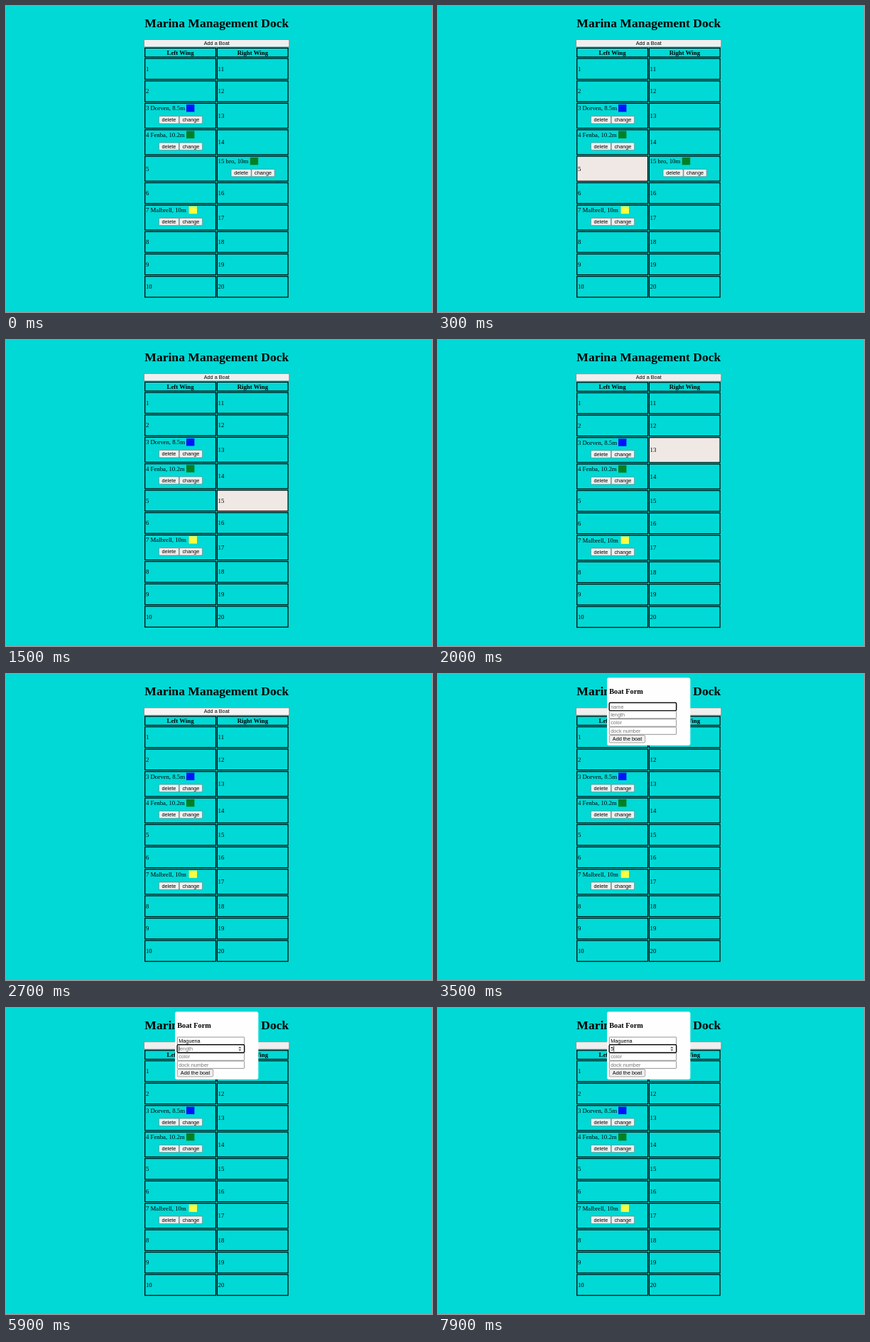
An HTML page for the animation above (8 s loop, 600x432 px).

```html
<!DOCTYPE html>
<html lang="en">
<head>
<meta charset="utf-8">
<title>Marina Management Dock</title>
<style>
html, body { margin: 0; width: 100%; height: 100%; overflow: hidden; background: #00d9d5; }
svg { display: block; }
text { white-space: pre; }
.serif { font: 8.8px "Liberation Serif", "Times New Roman", serif; }
.bold { font-weight: bold; }
.sans { font: 7.3px "Liberation Sans", Arial, sans-serif; }
.menu { font: 500 7.9px "Noto Sans", sans-serif; }
</style>
</head>
<body>
<svg id="stage" width="600" height="432" viewBox="0 0 600 432"></svg>
<script>
const LOOP = 8000;
const LINE = 1.2;
const stage = document.getElementById('stage');
const pen = document.createElement('canvas').getContext('2d');

// each track is a list of [start, value]; the last one reached holds
const at = (track, t) => track.reduce((v, [start, value]) => t >= start ? value : v, track[0][1]);

const hoverCell = [[0, 0], [200, 3], [300, 5], [500, 15], [1900, 14], [2000, 13], [2100, 0]];
const deleteFill = [[0, '#efefef'], [600, '#e5e5e5'], [1000, '#f5f5f5'], [1200, '#e2e5e8']];
const addFill = [[0, '#efefef'], [2300, '#e5e5e5'], [2700, '#f5f5f5'], [3000, '#efefef']];
const nameText = [[0, ''], [4600, 'M'], [4800, 'Ma'], [5000, 'Mag'], [5300, 'Magu'],
  [5500, 'Mague'], [5600, 'Maguen'], [5700, 'Maguena']];
const menuRows = [[0, 0], [4700, 3], [4900, 2], [5000, 1], [5800, 0]];
const caretOn = [[0, 0], [3000, 1], [3500, 0], [4100, 1], [6500, 0], [7100, 1], [7700, 0], [7900, 1]];
const names = ['Maguena', 'Malbrell', 'Melvo'];

const boats = {
  3: { label: 'Dorven, 8.5m', color: '#0014fc', x: 254 },
  4: { label: 'Fenba, 10.2m', color: '#048022', x: 254 },
  7: { label: 'Malbrell, 10m', color: '#fcfc40', x: 257.6 },
  15: { label: 'bro, 10m', color: '#048022', x: 343.8 }
};

const rect = (x, y, w, h, fill, extra = '') =>
  `<rect x="${x}" y="${y}" width="${w}" height="${h}" fill="${fill}" ${extra}/>`;
const text = (x, y, str, cls, extra = '') =>
  `<text x="${x}" y="${y}" class="${cls}" ${extra}>${str}</text>`;
const middle = 'text-anchor="middle"';

function button(x, y, w, label, fill = '#efefef') {
  return rect(x + .3, y + .3, w - .6, 10.4, fill, 'rx="1.4" stroke="#6f6f6f" stroke-width=".6"') +
    text(x + w / 2, y + 8, label, 'sans', middle);
}

function cellBox(x, y, h, fill) {
  return rect(x + LINE / 2, y + LINE / 2, 101 - LINE, h - LINE, fill,
    `stroke="#000" stroke-width="${LINE}"`);
}

function cell(n, x, y, h, t) {
  let out = cellBox(x, y, h, at(hoverCell, t) === n ? '#f0e8e4' : 'none');
  const boat = n === 15 && t >= 1500 ? null : boats[n];
  if (!boat) return out + text(x + 1.8, y + h / 2 + 3, n, 'serif');
  out += text(x + 1.8, y + 10.7, `${n} ${boat.label}`, 'serif');
  out += rect(boat.x, y + 2.3, 11.4, 10.5, boat.color);
  out += button(x + 20, y + 18.6, 28.8, 'delete', n === 15 ? at(deleteFill, t) : undefined);
  return out + button(x + 48.8, y + 18.6, 33, 'change');
}

function page(t) {
  const left = 195.1, right = 296.8;
  let out = text(296.8, 30, 'Marina Management Dock', 'serif bold', middle + ' style="font-size:17.57px"');
  out += button(194.2, 47.1, 205, 'Add a Boat', at(addFill, t));
  out += cellBox(left, 58.8, 13.8, 'none') + cellBox(right, 58.8, 13.8, 'none');
  out += text(245.6, 69, 'Left Wing', 'serif bold', middle);
  out += text(347.4, 69, 'Right Wing', 'serif bold', middle);
  let y = 73.5;
  for (let n = 1; n <= 10; n++) {
    const tall = n === 3 || n === 4 || n === 7 || (n === 5 && t < 1500);
    const pitch = tall ? 37.4 : 31.6;
    out += cell(n, left, y, pitch - 1, t) + cell(n + 10, right, y, pitch - 1, t);
    y += pitch;
  }
  return `<g transform="translate(0 ${t < 1700 ? 0 : .4})">${out}</g>`;
}

function field(y, value, hint, focus, caret) {
  const ring = focus
    ? rect(241.2, y - .2, 94.5, 11.2, '#fff', 'rx="1.5" stroke="#101010" stroke-width="1.5"')
    : rect(241.3, y + .3, 94.4, 10.4, '#fff', 'rx=".8" stroke="#767676" stroke-width=".8"');
  pen.font = '7.3px "Liberation Sans", Arial, sans-serif';
  const end = 243.4 + pen.measureText(value).width;
  return ring + text(243.2, y + 8, value || hint, 'sans', value ? '' : 'fill="#757575"') +
    (focus && caret ? rect(end, y + 1.4, .7, 8.2, '#000') : '');
}

function menu(count) {
  const h = 7.6 + 18.3 * count;
  let out = rect(241, 53, 97.6, h + .2, '#000', 'rx="2" opacity=".1"');
  out += rect(241.2, 52.2, 96.6, h, '#fff', 'rx="1.5" stroke="#d0d0d0" stroke-width=".5"');
  names.slice(0, count).forEach((name, i) => {
    out += text(247, 68.3 + 18.3 * i, name, 'menu');
  });
  return out;
}

function form(t) {
  const onLength = t >= 5900;
  const caret = at(caretOn, t);
  let out = rect(238, 5.2, 117.4, 95.6, '#fefefe', 'rx="2.7"');
  out += text(241.2, 27.6, 'Boat Form', 'serif bold', 'style="font-size:10.28px"');
  out += field(63.4, '', 'color') + field(74.6, '', 'dock number');
  out += button(241, 86.3, 51, 'Add the boat');
  out += field(40.8, at(nameText, t), 'name', !onLength, caret);
  out += field(52, t >= 7900 ? '5' : '', 'length', onLength, caret);
  if (onLength) out += '<path d="M327.4 56.8l2-2.2 2 2.2zM327.4 58.5l2 2.2 2-2.2z" fill="#4c4c4c"/>';
  const count = at(menuRows, t);
  return count ? out + menu(count) : out;
}

let last = '';
function draw(t) {
  const markup = page(t) + (t >= 2900 ? form(t) : '');
  if (markup !== last) stage.innerHTML = last = markup;
}

const start = performance.now();
function tick(now) {
  draw(Math.max(0, now - start) % LOOP);
  requestAnimationFrame(tick);
}
draw(0);
requestAnimationFrame(tick);
</script>
</body>
</html>
```
